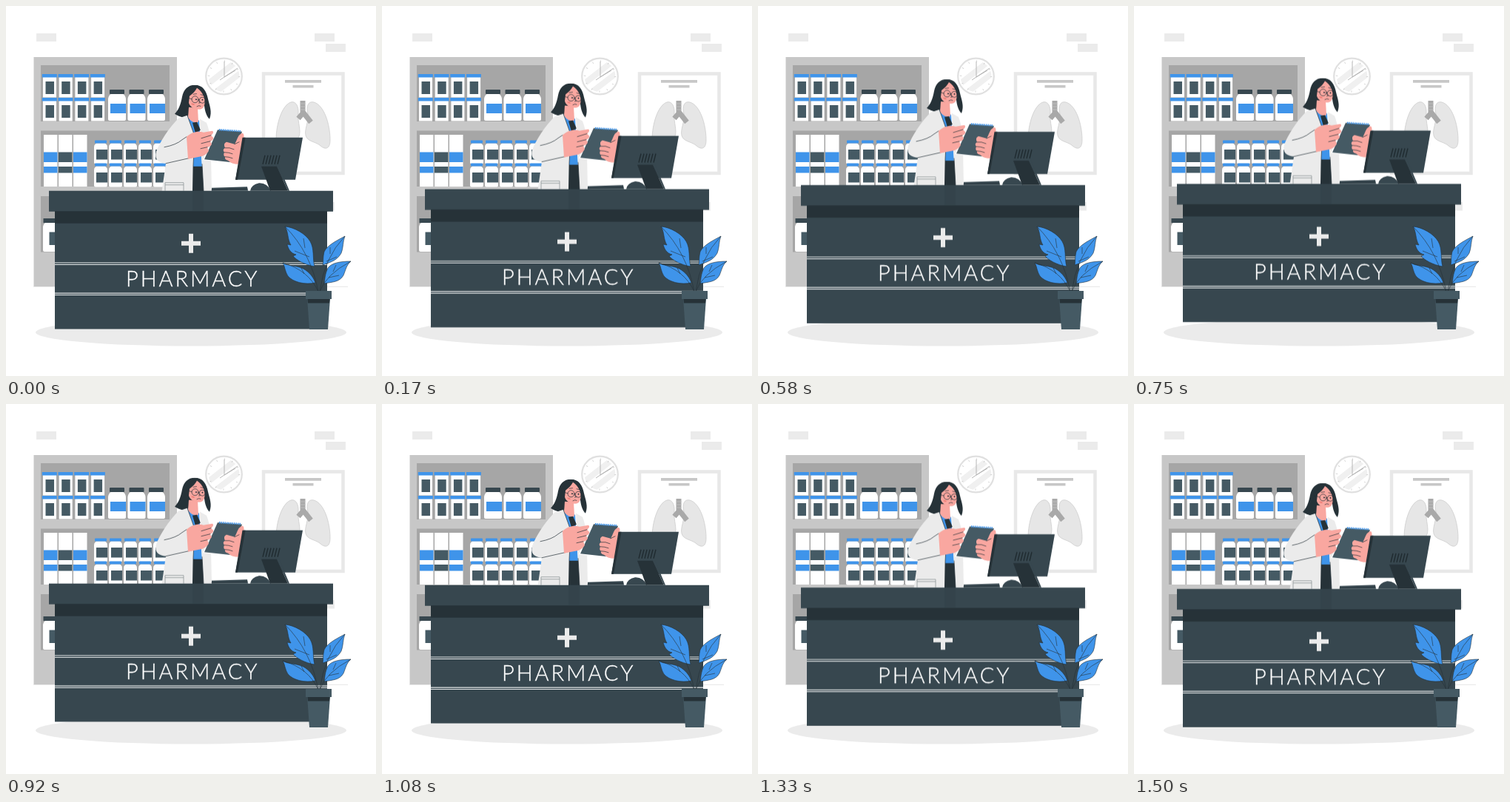
Write an HTML page without scripts that moves like this. It is 500x500 px and loops after 1.54 s.

```html
<!DOCTYPE html>
<html lang="en">
<head>
<meta charset="utf-8">
<title>Pharmacy counter</title>
<style>
  html, body { margin: 0; width: 100%; height: 100%; overflow: hidden; background: #fff; }
  svg { display: block; width: 100vw; height: 100vh; }
  .float { animation: float 1540ms linear infinite; }
  @keyframes float {
    0%, 100% { transform: translateY(-.25px); }
    47.3% { transform: translateY(-10px); }
    96% { transform: translateY(0); }
  }
  .slate { fill: #37474f; }
  .grey { fill: #455a64; }
  .ink { fill: #263238; }
  .blue { fill: #3f94ea; }
  .skin { fill: #f9a7a0; }
  .pale { fill: #ebebeb; }
  .white { fill: #fff; }
  .line { fill: none; stroke: #263238; stroke-width: .7; stroke-linecap: round; stroke-linejoin: round; }
  .sign { font: 300 29px Lato, "Open Sans", sans-serif; letter-spacing: 2.9px; text-anchor: middle; fill: #fff; stroke: #fff; stroke-width: .35; }
</style>
</head>
<body>
<svg viewBox="0 0 500 500">
  <defs>
    <g id="box">
      <path class="white" d="M1.500 4h18v27.500h-18z"/>
      <path class="blue" d="M.3 0h20v4.500H.3z"/>
      <path class="grey" d="M5 10h11.500v17H5z"/>
    </g>
    <g id="boxes">
      <use href="#box"/><use href="#box" x="21.700"/><use href="#box" x="43.400"/><use href="#box" x="65.100"/>
    </g>
    <g id="bottle">
      <path class="white" d="M4 6h17q3.500 3 3.500 7v27q0 2-2 2h-20q-2 0-2-2V13q0-4 3.500-7z"/>
      <rect class="slate" x="2.500" width="20" height="6" rx="1"/>
      <path class="blue" d="M3.500 19h21v13h-21z"/>
    </g>
    <g id="vial">
      <path class="white" d="M3 4h12q3 2 3 5v21q0 2-2 2H2q-2 0-2-2V9q0-3 3-5z"/>
      <rect class="blue" x="1" width="16" height="4" rx=".8"/>
      <path class="grey" d="M3 12.500h15v13.500H3z"/>
    </g>
    <g id="vials">
      <use href="#vial"/><use href="#vial" x="20"/><use href="#vial" x="40"/><use href="#vial" x="60"/><use href="#vial" x="80"/>
    </g>
    <g id="binder">
      <path class="white" d="M0 0h18.500v70H0z"/>
      <path fill="currentColor" d="M0 23.500h18.500V37H0zM0 43h18.500v8.500H0z"/>
    </g>
    <clipPath id="dial"><circle cx="294.500" cy="95" r="21"/></clipPath>
  </defs>

  <!-- Wall -->
  <path class="pale" d="M41 37h27v11H41zM417 37h27v11h-27zM432 51h27v11h-27zM417 265h27v11.500h-27z"/>
  <path d="M37 379.300h425" stroke="#e0e0e0" stroke-width=".8"/>
  <ellipse class="pale" cx="250" cy="441" rx="210" ry="18.500"/>

  <!-- Shelves -->
  <path fill="#c7c7c7" d="M37.500 69h193.500v310h-193.500z"/>
  <path fill="#a6a6a6" d="M47 80h174v76H47zM47 168.500h174V244H47zM47 257h174v75.500H47z"/>
  <use href="#boxes" x="48.500" y="92"/>
  <use href="#boxes" x="48.500" y="124"/>
  <use href="#bottle" x="137.500" y="113"/><use href="#bottle" x="164" y="113"/><use href="#bottle" x="190.500" y="113"/>
  <use href="#binder" x="51" y="174" color="#3f94ea"/>
  <use href="#binder" x="71" y="174" color="#455a64"/>
  <use href="#binder" x="91" y="174" color="#3f94ea"/>
  <use href="#vials" x="119" y="181.500"/>
  <use href="#vials" x="119" y="212.500"/>
  <path class="white" d="M53 293h20v39H52q-2 0-2-2v-32q0-3 3-5z"/>
  <path class="slate" d="M50.500 287h20v6h-20z"/>
  <path class="grey" d="M58.500 305.500h12v17.500h-12z"/>

  <!-- Clock -->
  <circle cx="294.500" cy="95" r="24.300" fill="#fff" stroke="#e0e0e0" stroke-width="2.200"/>
  <path clip-path="url(#dial)" d="M268 109l46-36M280 119l44-34" stroke="#f0f0f0" stroke-width="8"/>
  <circle cx="294.500" cy="95" r="20.500" fill="none" stroke="#c7c7c7" stroke-width="2.500" stroke-dasharray=".7 10.034"/>
  <path d="M295 75v21l15-9M295 96l-6 4M295 96l18-12" fill="none" stroke="#b5b5b5" stroke-width="1"/>

  <!-- Lung poster -->
  <path d="M348 91.500h107.500v134.500H348z" fill="#fff" stroke="#e8e8e8" stroke-width="4.500"/>
  <path fill="#c7c7c7" d="M377 100h49v3.800h-49zM387.500 107h28v3.600h-28z"/>
  <g fill="#e6e6e6" stroke="#c7c7c7" stroke-width=".7">
    <path d="M395 146C396 135 391 128 385 130C373 134 365 159 365 181C365 194 370 195 377 189C384 184 393 184 396 176C399 168 394 157 395 146z"/>
    <path d="M408 146C405 135 409 128 416 130C430 134 438 160 438 181C438 195 430 194 424 188C417 183 407 183 405 175C403 167 409 157 408 146z"/>
  </g>
  <path d="M401 128v17l-6 7M401 143l11 14" fill="none" stroke="#a9a9a9" stroke-width="7"/>
  <path d="M397 132h8M397 136h8M397 140h8" stroke="#c7c7c7" stroke-width=".7"/>

  <g class="float">
    <!-- Pharmacist -->
    <path class="ink" d="M255 107C246 107 240 113 238 123C236 134 233 141 228 146C232 149 239 151 245 152L250 140L268 135C269 143 271 149 275 153C279 143 275 135 273 126C271 115 266 107 255 107z"/>
    <path class="blue" d="M245 149L261 155L265 220H250z"/>
    <path class="ink" d="M252 217h15l1 35h-17z"/>
    <path class="skin" d="M247 137L246 151Q253 160 260 157L259 138z"/>
    <path class="skin" d="M248 122C252 119 256 115 258 111C264 115 267 120 268.500 127C269 135 267 140 261 140C254 140 248 136 247 131z"/>
    <path d="M260 128l2.500 3-2 .3M258 136q3-2 5-.5" class="line"/>
    <path fill="#f07f78" d="M250 132q4-1 5 2q-3 1-5-2z"/>
    <g class="line">
      <circle cx="255.500" cy="126.500" r="4.500"/>
      <circle cx="265.300" cy="127.500" r="4"/>
      <path d="M244 124l7 2M260 127h1.200M253 119.500l4.500-.6M263 120l4 1"/>
    </g>
    <circle class="ink" cx="257" cy="126.500" r="1"/>
    <circle class="ink" cx="265.500" cy="127" r="1"/>
    <path class="ink" d="M252 158l6-1 5 11-7 4z"/>

    <path class="pale" d="M262 153L271 158C275 168 277 181 277 202L278 251H267L265 214z"/>
    <path class="pale" d="M245 148L233 152C220 165 208 184 203 197C200 207 206 212 216 213L210.500 251H252L253 215L255 176z"/>
    <path class="line" d="M245 148L255 176L253 215V250M244 177L238 181Q230 188 214 191M216 213L247 206M265 214L267 250"/>
    <path d="M215 239h25v11M215 239v11M215 242h25" fill="none" stroke="#8f9699" stroke-width=".8"/>

    <!-- Notepad and hands -->
    <path class="white" d="M284 167L318 170L304 212L266 208.500z"/>
    <path class="grey" d="M286 167.500L319 170L305 211.500L268 207.500z"/>
    <path d="M288 167.500L318 169.500" fill="none" stroke="#3f94ea" stroke-width="2.500" stroke-dasharray="1.500 1"/>
    <path class="skin" d="M244 177C252 170 260 169 267 171L279 169Q282 171 277 175L280 178Q281 181 276 183L278 187Q276 191 272 191L274 196Q270 203 261 204L246 207z"/>
    <path class="line" d="M264 179l13-4M264 186l12-3M263 193l9-2"/>
    <path class="skin" d="M311 183Q315 172 320 172Q323 174 320 183L319 212Q309 217 300 209Q295 208 296 204Q293 202 295 198Q292 194 296 192Q293 186 298 184L309 187z"/>
    <path class="line" d="M296 192q6-1 12 2M295 198q6 0 11 2M296 204q5 0 10 2M309 187l6-3"/>

    <!-- Monitor and counter items -->
    <path class="slate" d="M330 250Q331 242 342 239.500Q353 239 358 250z"/>
    <path class="slate" d="M278 246L326 244.500L327 250H278z"/>
    <path class="line" d="M278 249L326 247.500"/>
    <path class="slate" d="M321 178h80l-10 57h-81z"/>
    <path class="ink" d="M319.500 178h4L313 235h-3z"/>
    <path class="ink" d="M345 217h21L381 250H357z"/>
    <path class="slate" d="M366 217h3L383 250h-2z"/>
    <path d="M350 202l-3 12m7-12l-3 12m7-12l-3 12m7-12l-3 12m7-12l-3 12m7-12l-3 12" stroke="#1f2a2f" stroke-width="1.300"/>

    <!-- Counter -->
    <path class="slate" d="M58 250h384v28H58zM66 277h368v160H66z"/>
    <path class="ink" d="M66 277.500h368V294H66z"/>
    <path class="ink" opacity=".15" d="M252 250h15v27h-15z"/>
    <path fill="none" stroke="#e6e9ea" stroke-width="1.100" d="M66 347.200h368M66 349.800h368M66 388.400h368M66 390.800h368"/>
    <path fill="#ebebeb" d="M247 308h6v10h10v6h-10v10h-6v-10h-10v-6h10z"/>
    <text class="sign" x="252.200" y="379.300">PHARMACY</text>
  </g>

  <!-- Plant -->
  <g stroke="#263238" stroke-width=".6" stroke-linejoin="round">
    <g class="blue">
      <path d="M377 298C390 299 405 308 411 318C417 328 414 341 417 352C404 350 392 343 388 338L392 336C384 334 381 327 380 322L385 323C380 315 382 306 377 298z"/>
      <path d="M374 347C380 352 396 350 405 357C412 362 416 368 418 374C403 377 388 373 381 365C377 359 377 352 374 347z"/>
      <path d="M458 311C449 316 434 323 430 332C428 340 429 346 428 350C440 346 448 343 453 334C456 327 455 318 458 311z"/>
      <path d="M466 345C452 345 440 347 435 354C431 362 431 369 430 375C441 373 451 373 456 364C459 357 460 350 466 345z"/>
    </g>
    <path fill="none" d="M377 298Q412 333 422 386M374 347Q409 357 422 386M458 311Q430 340 424 386M466 345Q432 363 424 386M404 327l-2-13M410 339l-20-8M403 362l-4-8M438 335v-9M433 345l14-6M442 359l4-9M436 367l14-3"/>
  </g>
  <path class="grey" d="M407 395h31l-3 42h-25z"/>
  <path class="ink" d="M407.500 396h30l-.5 5.500h-29z"/>
  <path class="grey" d="M405 385h35v11h-35z"/>
</svg>
</body>
</html>
```
